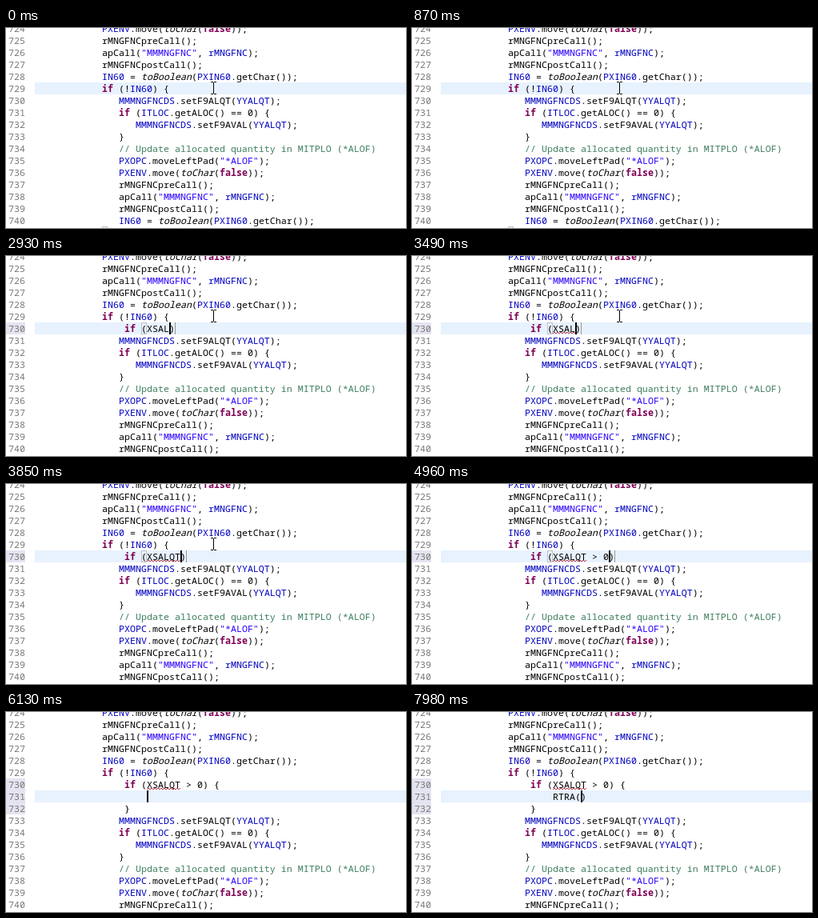
Animation of 500x250 px, one loop 8 s. Source, as an HTML page:

```html
<!DOCTYPE html>
<html lang="en">
<head>
<meta charset="utf-8">
<title>Code editor</title>
<style>
  html, body { margin: 0; width: 100%; height: 100%; overflow: hidden; background: #fff; }
  svg { display: block; width: 500px; height: 250px; }
  text { font: 11.667px "Noto Sans Mono", "DejaVu Sans Mono", monospace; white-space: pre; fill: #000; }
  .num { fill: #787878; }
  .word { fill: #7f0055; font-weight: bold; }
  .field { fill: #0000c0; }
  .str { fill: #2a00ff; }
  .note { fill: #3f7f5f; }
  .call { font-style: italic; }
</style>
</head>
<body>
<svg id="stage" viewBox="0 0 500 250"></svg>
<script>
const LOOP = 8000, FIRST = 724, ROW = 15, CHAR = 7, LEFT = 36;
const stage = document.getElementById("stage");

// Each line: indent in columns, then the code.
const head = [
  [12, "PXENV.move(toChar(false));"],
  [12, "rMNGFNCpreCall();"],
  [12, 'apCall("MMMNGFNC", rMNGFNC);'],
  [12, "rMNGFNCpostCall();"],
  [12, "IN60 = toBoolean(PXIN60.getChar());"],
  [12, "if (!IN60) {"]
];
const tail = [
  [15, "MMMNGFNCDS.setF9ALQT(YYALQT);"],
  [15, "if (ITLOC.getALOC() == 0) {"],
  [18, "MMMNGFNCDS.setF9AVAL(YYALQT);"],
  [15, "}"],
  [15, "// Update allocated quantity in MITPLO (*ALOF)"],
  [15, 'PXOPC.moveLeftPad("*ALOF");'],
  [15, "PXENV.move(toChar(false));"],
  [15, "rMNGFNCpreCall();"],
  [15, 'apCall("MMMNGFNC", rMNGFNC);'],
  [15, "rMNGFNCpostCall();"],
  [15, "IN60 = toBoolean(PXIN60.getChar());"]
];

// Changes over time; "|" in the edited line is the caret,
// "match" is the row and column of the boxed bracket.
const steps = [
  [0, { row: 729, line: "if (!IN60) {", mouse: true, match: [741, 12] }],
  [370, { line: "if (!IN60) {|" }],
  [870, { line: "if (!IN60) {" }],
  [1110, { row: 730, line: "|", match: null }],
  [1350, { line: "i|", mouse: false }],
  [1440, { line: "if|" }],
  [1530, { line: "if |" }],
  [1900, { line: "if (|)", linked: true }],
  [2150, { line: "if (X|)", match: [730, 19] }],
  [2330, { line: "if (XS|)" }],
  [2510, { line: "if (XSA|)" }],
  [2690, { line: "if (XSAL|)" }],
  [2930, { mouse: true }],
  [3490, { wavy: true }],
  [3730, { line: "if (XSALQ|)" }],
  [3850, { line: "if (XSALQT|)" }],
  [4030, { line: "if (XSALQT |)", mouse: false }],
  [4280, { line: "if (XSALQT >|)", match: null }],
  [4460, { line: "if (XSALQT > |)", match: [730, 19] }],
  [4960, { line: "if (XSALQT > 0|)" }],
  [5020, { mouse: true }],
  [5390, { line: "if (XSALQT > 0)|", mouse: false, linked: false }],
  [5510, { line: "if (XSALQT > 0) |", match: null }],
  [5820, { line: "if (XSALQT > 0) {|" }],
  [6130, { row: 731, line: "|" }],
  [6690, { line: "" }],
  [6750, { mouse: true }],
  [6930, { line: "R|", mouse: false }],
  [7170, { line: "RT|" }],
  [7360, { line: "RTR|" }],
  [7480, { line: "RTRA|" }],
  [7980, { line: "RTRA(|)" }]
];
let merged = {};
const states = steps.map(([time, change]) => (merged = { ...merged, ...change, time }));

const rowY = row => 68 + (row - 729) * ROW;
const colX = col => LEFT + col * CHAR;
const rect = (x, y, w, h, fill) =>
  `<rect x="${x}" y="${y}" width="${w}" height="${h}" fill="${fill}"/>`;
const safe = s => s.replace(/&/g, "&amp;").replace(/</g, "&lt;").replace(/>/g, "&gt;");

const kinds = ["note", "str", "word", "call", "field"];
const syntax = /(\/\/.*)|("[^"]*")|\b(if|false)\b|\b(toChar|toBoolean)\b|\b(PXENV|PXOPC|PXIN60|IN60|ITLOC|YYALQT|rMNGFNC|MMMNGFNCDS)\b/g;

function paint(code) {
  return safe(code).replace(syntax, (all, ...groups) => {
    const kind = kinds[groups.slice(0, kinds.length).findIndex(Boolean)];
    return `<tspan class="${kind}">${all}</tspan>`;
  });
}

function linesOf(s) {
  const typed = s.line.replace("|", "");
  if (s.row === 729) return [...head, ...tail];
  if (s.row === 730) return [...head, [16, typed], ...tail];
  return [...head, [16, "if (XSALQT > 0) {"], [20, typed], [16, "}"], ...tail];
}

function wave(x, width, y) {
  let d = `M${x} ${y + 2}`;
  for (let i = 2; i <= width; i += 2) d += `L${x + i} ${y + (i % 4 ? 0 : 2)}`;
  return `<path d="${d}" fill="none" stroke="#b83a50"/>`;
}

function draw(s) {
  const lines = linesOf(s);
  const y = rowY(s.row);
  const start = colX(lines[s.row - FIRST][0]);
  let out = rect(LEFT, y, 500 - LEFT, ROW, "#e8f2fe");

  const added = { 729: 0, 730: 1, 731: 3 }[s.row];
  out += rect(0, rowY(730), 24, added * ROW, "#e4e4f1");

  lines.slice(0, 17).forEach(([indent, code], i) => {
    const base = rowY(FIRST + i) + 12;
    out += `<text class="num" x="3" y="${base}">${FIRST + i}</text>`;
    out += `<text x="${colX(indent)}" y="${base}">${paint(code)}</text>`;
  });

  if (s.wavy) {
    const word = lines[6][1].match(/XSAL\w*/)[0];
    out += wave(colX(20), word.length * CHAR, 95);
  }
  if (s.match) {
    const [row, col] = s.match;
    out += `<rect x="${colX(col) + 0.5}" y="${rowY(row) + 0.5}" width="6" height="14" fill="none" stroke="#c0c0c0"/>`;
  }
  if (s.linked) out += rect(start + (s.line.length - 1) * CHAR, y, 1, ROW, "#8f9a8f");

  const caret = s.line.indexOf("|");
  if (caret >= 0) out += rect(start + caret * CHAR, y, 2, ROW, "#000");

  if (s.mouse) {
    out += '<path d="M256 67.5h3m1 0h3M259.5 68v14M256 82.5h3m1 0h3" fill="none" stroke="#000"/>';
  }
  stage.innerHTML = out;
}

const begin = performance.now();
let shown = null;
function tick() {
  const time = (performance.now() - begin) % LOOP;
  const state = states.filter(s => s.time <= time).pop();
  if (state !== shown) draw(shown = state);
  requestAnimationFrame(tick);
}
tick();
</script>
</body>
</html>
```
